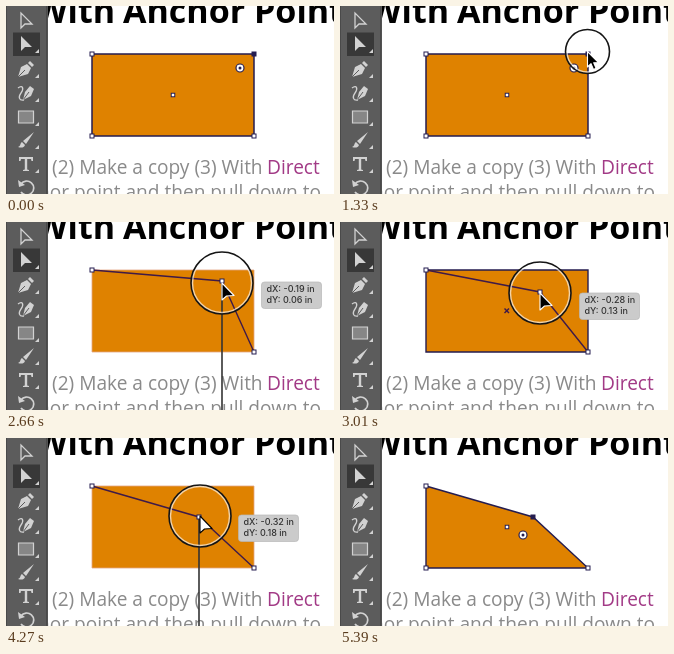
An HTML page with a canvas for the animation above (6.02 s loop, 328 by 188 pixels).

```html
<!DOCTYPE html>
<html lang="en">
<head>
<meta charset="utf-8">
<title>Anchor point drag</title>
<style>
  html, body { margin: 0; width: 100%; height: 100%; overflow: hidden; background: #fff; }
  canvas { display: block; width: 328px; height: 188px; }
</style>
</head>
<body>
<canvas id="stage" width="328" height="188"></canvas>
<script>
const ctx = document.getElementById('stage').getContext('2d');
const LOOP = 6020, STEP = 70;
const ORANGE = '#df8200', NAVY = '#251d50', BLUE = '#39329a', ICON = '#d2d2d2';
const SMALL = '500 9px Inter, "Noto Sans", sans-serif';
const PX_PER_INCH = 171;
const TL = [86, 48], TR = [248, 48], BR = [248, 130], BL = [86, 130], MID = [167, 89];
const END = [193, 79];

// time, x, y
const POINTER = [
  [70, 303, 151], [630, 256, 47], [910, 247.5, 45.5], [2380, 247.5, 45.5],
  [2660, 216, 61], [3010, 200, 71], [3360, 194, 78],
  [4690, 194, 78], [5110, 290, 190]
];
const DRAG = [[2380, ...TR], [2660, 216, 59], [3010, 200, 70], [3360, ...END]];
const RING = [[2170, 22], [2380, 31], [4270, 31], [4480, 22]];

function track(keys, t) {
  if (t <= keys[0][0]) return keys[0].slice(1);
  for (let i = 1; i < keys.length; i++) {
    const [t0, ...a] = keys[i - 1], [t1, ...b] = keys[i];
    if (t <= t1) return a.map((v, k) => v + (b[k] - v) * (t - t0) / (t1 - t0));
  }
  return keys[keys.length - 1].slice(1);
}

const within = (t, from, to) => t >= from && t < to;

function paint({ fill, stroke, width = 1 }) {
  if (fill) { ctx.fillStyle = fill; ctx.fill(); }
  if (stroke) { ctx.strokeStyle = stroke; ctx.lineWidth = width; ctx.stroke(); }
}

function shape(points, style) {
  ctx.beginPath();
  points.forEach(([x, y]) => ctx.lineTo(x, y));
  if (!style.open) ctx.closePath();
  paint(style);
}

function circle(x, y, r, style) {
  ctx.beginPath();
  ctx.arc(x, y, r, 0, Math.PI * 2);
  paint(style);
}

function label(str, x, y, font, color, align = 'left') {
  ctx.font = font;
  ctx.fillStyle = color;
  ctx.textAlign = align;
  ctx.fillText(str, x, y);
}

function handle([x, y], solid, color = NAVY, size = 5) {
  const h = size / 2;
  ctx.fillStyle = color;
  ctx.fillRect(x - h, y - h, size, size);
  if (solid) return;
  ctx.fillStyle = '#fff';
  ctx.fillRect(x - h + 1, y - h + 1, size - 2, size - 2);
}

function cornerWidget(x, y) {
  circle(x, y, 4, { fill: '#fff', stroke: NAVY, width: 1.2 });
  circle(x, y, 1.5, { fill: NAVY });
}

function drawText() {
  const title = '700 34px "Open Sans", "Noto Sans", sans-serif';
  const body = '19.1px "Open Sans", "Noto Sans", sans-serif';
  label('With', 109, 17, title, '#000', 'right');
  label('Anchor', 117, 17, title, '#000');
  label('Point', 248, 17, title, '#000');
  label('(2) Make a copy (3) With', 46, 168, body, '#8a8a8a');
  label('Direct', 261, 168, body, '#a23a86');
  label('anchor ', 68, 193, body, '#8a8a8a', 'right');
  label('point and then pull down to', 68, 193, body, '#8a8a8a');
}

function icon(y, path, style) {
  ctx.save();
  ctx.translate(20, y);
  const p = new Path2D(path);
  if (style.fill) { ctx.fillStyle = style.fill; ctx.fill(p); }
  if (style.stroke) {
    ctx.strokeStyle = style.stroke;
    ctx.lineWidth = style.width || 1.3;
    ctx.stroke(p);
  }
  ctx.restore();
}

function drawPanel() {
  ctx.fillStyle = '#5c5c5c';
  ctx.fillRect(0, 0, 42, 188);
  ctx.fillStyle = '#4a4a4a';
  ctx.fillRect(0, 0, 1, 188);
  ctx.fillRect(40, 0, 1.5, 188);
  ctx.fillStyle = '#383838';
  ctx.fillRect(7, 26.5, 27, 23.5);

  const solid = { fill: ICON }, line = { stroke: ICON };
  const arrow = 'M-5-8 L-5 7 L-1 3 L6 3 Z';
  icon(15, arrow, line);
  icon(38, arrow, solid);
  icon(63, 'M-8 8 L-5-2 L1-5 L5-1 L2 5 Z M2-6 L4-8 L8-4 L6-2 Z', solid);
  icon(63, 'M-8 8 L-1 1', { stroke: '#5c5c5c', width: 1 });
  icon(87, 'M-3 7 L-1-1 L4-7 L8-4 L5 3 Z', solid);
  icon(87, 'M-3 7 L3-1', { stroke: '#5c5c5c', width: 1 });
  icon(87, 'M-8-5 C-3-9 -2-4 -5 0 C-8 4 -7 8 -2 7', line);
  icon(111, 'M-7.5-6 H7.5 V6 H-7.5 Z', { fill: '#868686', stroke: ICON, width: 1.2 });
  icon(134, 'M8-8 L0 4 L-3 1 Z M-4 2 L-1 5 C-2 8 -5 8 -8 7 C-5 6 -6 3 -4 2 Z', solid);
  icon(158, 'M-7-7 H7 V-3 H5.5 L5-5 H1.2 V5.5 L3 6 V7 H-3 V6 L-1.2 5.5 V-5 H-5 L-5.5-3 H-7 Z', solid);
  icon(181, 'M-5-3 A7 7 0 1 1 -5 5', { stroke: ICON, width: 1.7 });
  icon(181, 'M-8-7 L-7 0 L-1-2 Z', solid);
  for (const y of [46, 71, 95, 119, 142, 166])
    shape([[33, y - 3], [33, y + 1], [29, y + 1]], solid);
}

function drawCursor(x, y, white, head) {
  const outline = head
    ? [[0, 0], [0, 17], [4.5, 13], [12, 12.5]]
    : [[0, 0], [0, 15.5], [3.5, 12.2], [6, 18], [8.6, 16.8], [6.2, 11.3], [11, 11]];
  ctx.lineJoin = 'round';
  shape(outline.map(([a, b]) => [x + a, y + b]),
    { fill: white ? '#fff' : '#000', stroke: white ? '#000' : '#fff', width: 1.1 });
  ctx.lineJoin = 'miter';
}

function tooltip(x, y, lines) {
  ctx.beginPath();
  ctx.roundRect(x, y, 60, 26.5, 3);
  paint({ fill: '#cbcbcb', stroke: '#b8b8b8', width: 0.7 });
  lines.forEach((s, i) => label(s, x + 5, y + 9.5 + i * 11.5, SMALL, '#333'));
}

function drawBefore(t) {
  const hover = t >= 1470, pressed = t >= 2170;
  const color = hover ? BLUE : NAVY;
  shape([TL, TR, BR, BL], { fill: ORANGE, stroke: color, width: 1.5 });
  [TL, BR, BL].forEach(p => handle(p, false, color));
  handle(TR, true, color, hover ? 7 : 5);
  handle(MID, pressed, NAVY, 4.5);
  if (!pressed) cornerWidget(234, 62);
  if (hover) {
    label('anchor', 253, 46, SMALL, '#222');
    tooltip(288, 48.5, ['X: 4.01 in', 'Y: 0.92 in']);
  }
}

function drawDrag(t) {
  const p = track(DRAG, t);
  const hovering = within(t, 2800, 4270), released = t >= 4270;
  const edge = { stroke: '#3f1a48', width: 1.4, open: true };
  shape([TL, TR, BR, BL], hovering
    ? { fill: ORANGE, stroke: NAVY, width: 1.4 }
    : { fill: ORANGE, stroke: '#e3a585', width: 0.8 });
  shape([TL, p, BR], edge);
  if (hovering) {
    const [x, y] = MID;
    shape([[x - 2.5, y - 2.5], [x + 2, y + 2]], edge);
    shape([[x + 2, y - 2.5], [x - 2.5, y + 2]], edge);
  }
  if (within(t, 2590, 2800) || released)
    shape([p, [p[0], 188]], { stroke: '#333', width: 1.6, open: true });
  [TL, p, BR].forEach(q => handle(q));
  const inches = v => (v / PX_PER_INCH).toFixed(2) + ' in';
  tooltip(p[0] + 39.5, p[1] + (released ? -2 : 1),
    ['dX: ' + inches(p[0] - TR[0]), 'dY: ' + inches(p[1] - TR[1])]);
}

function drawAfter(t) {
  shape([TL, END, BR, BL], { fill: ORANGE, stroke: NAVY, width: 1.4 });
  [TL, BR, BL].forEach(p => handle(p));
  handle(END, true);
  handle(MID, false, NAVY, 4.5);
  if (t >= 5320) cornerWidget(183, 97);
}

function drawPointer(t) {
  if (!within(t, 70, 5320)) return;
  const [x, y] = track(POINTER, t);
  if (within(t, 1330, 4550)) {
    const [r] = track(RING, t);
    circle(x, y, r - 1.2, { stroke: 'rgba(255,255,255,.65)', width: 2 });
    circle(x, y, r, { stroke: '#151515', width: 1.6 });
  }
  const dragging = within(t, 2450, 4270);
  drawCursor(x, y, t >= 1470 && !dragging, t >= 1470);
}

function render(time) {
  const t = Math.floor((time % LOOP) / STEP) * STEP;
  ctx.fillStyle = '#fff';
  ctx.fillRect(0, 0, 328, 188);
  drawText();
  if (t < 2450) drawBefore(t);
  else if (t < 4410) drawDrag(t);
  else drawAfter(t);
  drawPointer(t);
  drawPanel();
}

let start;
function tick(now) {
  start ??= now;
  render(now - start);
  requestAnimationFrame(tick);
}
render(0);
requestAnimationFrame(tick);
</script>
</body>
</html>
```
